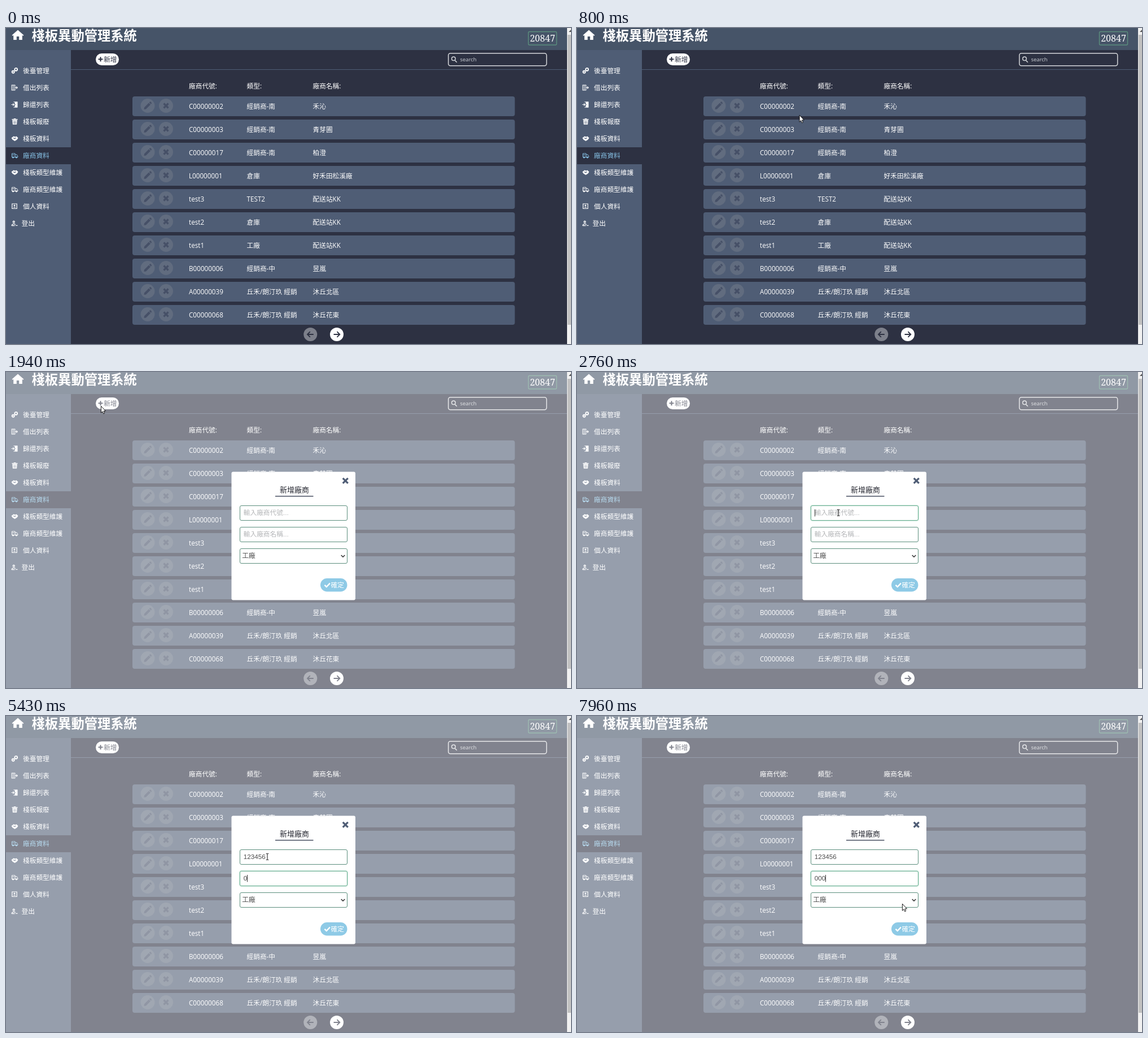
An HTML page for the animation above (8 s loop, 1001 by 559 pixels).

```html
<!DOCTYPE html>
<html lang="zh-Hant">
<head>
<meta charset="utf-8">
<title>棧板異動管理系統</title>
<style>
  html, body { margin: 0; width: 100%; height: 100%; overflow: hidden; background: #2d3142; }
  svg { display: block; width: 1001px; height: 559px; }
  text { font: 11.7px "Open Sans", "Noto Sans CJK TC", sans-serif; fill: #fff; white-space: pre; }
  .title { font-size: 23.3px; font-weight: 700; }
  .badge { font: 16px "Noto Serif", serif; text-anchor: middle; }
  .search { font-size: 9.5px; fill: #cfd2d8; }
  .field { font: 11.7px "Liberation Sans", "Noto Sans CJK TC", sans-serif; fill: #4a4a4a; }
  .empty { fill: #b4b6b8; }
  .line { fill: none; stroke: currentColor; }
  #add { color: #2d3142; }
  #add rect { fill: #fff; }
  #add text { fill: currentColor; }
  #add.hover { color: #dfece4; }
  #add.hover rect { fill: #5b8e7d; }
  .box { fill: #fff; stroke: #5b8e7d; }
  .focus .box { stroke: #62ab8c; filter: drop-shadow(0 0 1px #8fd0b4); }
</style>
</head>
<body>
<svg id="stage" viewBox="0 0 1001 559"></svg>
<script>
const LOOP = 8000, STEP = 68.2, BLINK = 530;

const text = (x, y, s, cls = "") => `<text x="${x}" y="${y}" class="${cls}">${s}</text>`;
const rect = (x, y, w, h, fill, r = 0) =>
  `<rect x="${x}" y="${y}" width="${w}" height="${h}" rx="${r}" fill="${fill}"/>`;
const line = (d, width = 1, color = "currentColor") =>
  `<path d="${d}" fill="none" stroke="${color}" stroke-width="${width}"/>`;
const solid = (d, color = "currentColor") => `<path d="${d}" fill="${color}" fill-rule="evenodd"/>`;
const at = (x, y, body) => `<g transform="translate(${x} ${y})">${body}</g>`;
const ring = (x, y, r, w) =>
  `<circle class="line" cx="${x}" cy="${y}" r="${r}" stroke-width="${w}"/>`;

// Sidebar icons, each in a 12 by 12 box
const truck = line("M1 2.5H6.5V9H1ZM6.5 4.5H9.5L11.3 7V9H6.5M2 5H5") + ring(3, 9.3, 1, 1.2) + ring(9, 9.3, 1, 1.2);
const pallet = solid("M0 5 4 2 7 3 9 2 12 5 10 8 6 10.5 2 8ZM3 5.2 6 7 8.5 5 7.8 4.3 5.8 5.4 4.6 4.5Z");
const icons = {
  gears: ring(3.2, 8.2, 2, 1.9) + ring(8.2, 3.8, 2.4, 1.9),
  out: line("M.7 1.5H6.3V10.5H.7ZM3.4 1.5V10.5M6.5 6H10.5M8.7 4 10.7 6 8.7 8", 1.1),
  enter: solid("M6 .8H11V11.2H6ZM7 5.3V6.7H8V5.3Z") + line("M0 6H4.5M2.7 4 4.6 6 2.7 8M4 1.3H6M4 10.7H6", 1.1),
  trash: solid("M1 1.5H4L4.5.6H7.5L8 1.5H11V3H1ZM1.8 3.6H10.2L9.6 11.2H2.4ZM4 5V10H4.7V5ZM5.7 5V10H6.4V5ZM7.4 5V10H8.1V5Z"),
  pallet, truck,
  card: line("M1.3 1.5H9.7V10H1.3Z", 1.2) + ring(5.5, 4.6, .8, 1.4) + solid("M3 8.6Q5.5 5.2 8 8.6Z"),
  user: ring(4.3, 3.5, 1.5, 1.3) + line("M.8 10V9Q2 6.8 4.3 6.8T7 8.5M.3 10H6M7.5 9.8H11", 1.3),
};
const menu = [
  ["gears", "後臺管理"], ["out", "借出列表"], ["enter", "歸還列表"], ["trash", "棧板報廢"],
  ["pallet", "棧板資料"], ["truck", "廠商資料"], ["pallet", "棧板類型維護"],
  ["truck", "廠商類型維護"], ["card", "個人資料"], ["user", "登出"],
];
const vendors = [
  ["C00000002", "經銷商-南", "禾沁"], ["C00000003", "經銷商-南", "青芽圃"],
  ["C00000017", "經銷商-南", "柏澄"], ["L00000001", "倉庫", "好禾田松溪廠"],
  ["test3", "TEST2", "配送站KK"], ["test2", "倉庫", "配送站KK"], ["test1", "工廠", "配送站KK"],
  ["B00000006", "經銷商-中", "昱嵐"], ["A00000039", "丘禾/朗汀玖 經銷", "沐丘北區"],
  ["C00000068", "丘禾/朗汀玖 經銷", "沐丘花東"],
];

const columns = (cells, y) => cells.map((s, i) => text([324, 426.5, 543.5][i], y, s)).join("");
const disc = (x, y, r, fill) => `<circle cx="${x}" cy="${y}" r="${r}" fill="${fill}"/>`;

function menuItem([icon, label], i) {
  const y = 76 + 30 * i, active = i === 5;
  const color = active ? "#86c0e4" : "#fff";
  return (active ? rect(0, 211, 115, 30, "#2d3142") : "") +
    `<g color="${color}">${at(9.5, y - 6.5, icons[icon])}</g>` +
    `<text x="${i === 9 ? 27.5 : 30}" y="${y + 4.4}" style="fill:${color}">${label}</text>`;
}

function vendorRow(cells, i) {
  const y = 121 + 41 * i, ink = "#465067";
  return rect(224, y, 677.5, 35, "#4f5d75", 4) +
    disc(251, y + 16.5, 12.5, "#616c7f") + disc(283.5, y + 16.5, 12.5, "#616c7f") +
    at(251, y + 16.5, solid("M-6.5 6.5-6 3 2-5 5 -2-3 6ZM2.8-5.8 4-7Q5-7.5 6-6.5T7-4L5.8-2.8Z", ink)) +
    at(283.5, y + 16.5, line("M-4-4 4 4M4-4-4 4", 3.2, ink)) +
    columns(cells, y + 22.3);
}

const arrow = (x, fill, flip) => disc(x, 542, 12, fill) +
  at(x, 542, `<g transform="scale(${flip} 1)">${line("M-5.5 0H5M.5-4.8 5.3 0 .5 4.8", 1.9, "#2d3142")}</g>`);

const page =
  rect(0, 0, 1001, 559, "#2d3142") + rect(0, 0, 994, 39, "#465468") + rect(0, 39, 115, 520, "#4f5d75") +
  rect(115, 73, 879, 1, "#4f5d75") +
  solid("M21 3.5 31.5 12.7 30.2 14 28.8 12.8V21H23.2V15H18.8V21H13.2V12.8L11.8 14 10.5 12.7Z", "#fff") +
  text(45.5, 22.4, "棧板異動管理系統", "title") +
  `<rect x="925.5" y="6.5" width="50" height="23.5" rx="2" fill="none" stroke="#5b8e7d" stroke-width="1.4"/>` +
  text(950.5, 24, "20847", "badge") +
  menu.map(menuItem).join("") +
  `<g id="add">${rect(159, 45, 41, 21, "", 10.5)}${line("M163.5 55.3H171.5M167.5 51.3V59.3", 2.1)}${text(173, 59.8, "新增")}</g>` +
  `<rect x="783.7" y="44.7" width="174" height="22" rx="3.5" fill="none" stroke="#d4d6da" stroke-width="1.5"/>` +
  line("M795.6 57.6 798.8 60.8M796.2 54.3A3.3 3.3 0 1 1 789.6 54.3 3.3 3.3 0 1 1 796.2 54.3Z", 1.5, "#d4d6da") +
  text(804.5, 59.3, "search", "search") +
  columns(["廠商代號:", "類型:", "廠商名稱:"], 107.4) +
  vendors.map(vendorRow).join("") +
  arrow(539.3, "#7d808b", -1) + arrow(586, "#fff", 1);

const scrollbar = rect(994, 0, 7, 559, "#f1f1f1") + rect(995, 12, 6, 513, "#c1c1c1") +
  solid("M997 7 1001 3V7Z", "#505050");

const box = y => `<rect class="box" x="414.5" y="${y + .5}" width="190" height="26" rx="2.5"/>`;
const input = y => `<g class="input">${box(y)}${text(420.8, y + 17, "", "field")}</g>`;
const modal = `<g id="modal">` + rect(0, 0, 994, 559, "rgba(255,255,255,.4)") +
  rect(399.5, 176.5, 219.5, 227, "#fff", 3) +
  `<text x="511" y="213.4" text-anchor="middle" style="font-size:13px;fill:#20222c">新增廠商</text>` +
  rect(477, 219, 67.5, 1.4, "#3d4458") +
  line("M596.8 187.8 605.8 196.8M605.8 187.8 596.8 196.8", 3.3, "#4f5d75") +
  input(236) + input(274) + box(312) + text(418.3, 329.3, "工廠", "field") +
  line("M593.8 324 597 327.2 600.2 324", 1.6, "#333") +
  rect(557, 365, 47.5, 23.5, "#8ecae6", 11.7) + line("M564.5 376.8 567.8 380 574 373.6", 2.3, "#fff") +
  text(575.5, 381.2, "確定") + `<rect id="caret" width="1" height="12.5" fill="#333"/></g>`;

const edge = 'fill="#fff" stroke="#000" stroke-width=".9" stroke-linejoin="round"';
const pointer = `<g id="pointer">
  <path id="arrow" ${edge} d="M.4.3V12.3L3 9.8 4.7 13.8 6.7 13 5 9H8.6Z"/>
  <path id="hand" ${edge} d="M0 1Q1.2-.6 2.2 1V5.4Q3.6 4.6 4.2 6 5.6 5.2 6.2 6.6 7.8 6 8 7.6V11.5L6.6 16H.6L-3.4 10Q-3.6 8.2-1.6 9L0 10.4Z"/>
  <path id="beam" fill="none" stroke="#111" d="M-2.2-5.5H-.6L0-5 .6-5.5H2.2M0-5V5M-2.2 5.5H-.6L0 5 .6 5.5H2.2"/></g>`;

const $ = id => document.getElementById(id);
$("stage").innerHTML = page + modal + scrollbar + pointer;
const inputs = [...document.querySelectorAll(".input")];
const hints = ["輸入廠商代號...", "輸入廠商名稱..."];

// Pointer waypoints: time, x, y
const path = [
  [320, 968, 545], [456, 783, 406], [661, 495, 238], [797, 394, 154], [1070, 205, 72],
  [1138, 176, 63], [1206, 168, 60], [2010, 168, 60], [2200, 265, 125], [2400, 425, 225],
  [2548, 463, 249], [6570, 463, 249], [6930, 505, 319], [7600, 505, 319],
  [7685, 570, 357], [7870, 570, 357], [7955, 576, 332], [LOOP, 576, 332],
];
// Keyboard events: time, field, key (empty key moves the focus there)
const keys = [
  [2690, 0, ""], [3570, 0, "1"], [3670, 0, "2"], [3770, 0, "3"], [4100, 0, "4"], [4200, 0, "5"],
  [4300, 0, "6"], [4830, 1, ""], [5430, 1, "0"], [5630, 1, "0"], [5830, 1, "0"],
];

function pointerAt(t) {
  const q = 320 + Math.floor((t - 320) / STEP + 1e-6) * STEP;
  const i = Math.max(1, path.findIndex(p => p[0] > q));
  const [t0, x0, y0] = path[i - 1], [t1, x1, y1] = path[i];
  const u = Math.max(0, (q - t0) / (t1 - t0));
  return [x0 + (x1 - x0) * u, y0 + (y1 - y0) * u];
}
const inside = ([x, y], l, t, r, b) => x >= l && x <= r && y >= t && y <= b;
const show = (id, on) => $(id).style.display = on ? "" : "none";

function draw(t) {
  const open = t >= 1940, p = pointerAt(t);
  const hover = !open && t >= 320 && inside(p, 159, 45, 200, 66);
  const typing = open && (inside(p, 414, 236, 605, 263) || inside(p, 414, 274, 605, 301));
  show("modal", open);
  show("pointer", t >= 320);
  show("hand", hover);
  show("beam", typing);
  show("arrow", !hover && !typing);
  $("pointer").setAttribute("transform", `translate(${p[0]} ${p[1]})`);
  $("add").classList.toggle("hover", hover);

  const done = keys.filter(k => k[0] <= t), last = done[done.length - 1];
  inputs.forEach((el, i) => {
    const value = done.filter(k => k[1] === i).map(k => k[2]).join("");
    const focused = !!last && last[1] === i;
    const label = el.querySelector("text");
    el.classList.toggle("focus", focused);
    label.textContent = value || hints[i];
    label.classList.toggle("empty", !value);
    if (focused) {
      $("caret").setAttribute("x", Math.floor(421 + 6.5 * value.length));
      $("caret").setAttribute("y", 243 + 38 * i);
    }
  });
  show("caret", last && Math.floor((t - last[0]) / BLINK) % 2 === 0);
}

const start = performance.now();
function frame() {
  draw((performance.now() - start) % LOOP);
  requestAnimationFrame(frame);
}
frame();
</script>
</body>
</html>
```
